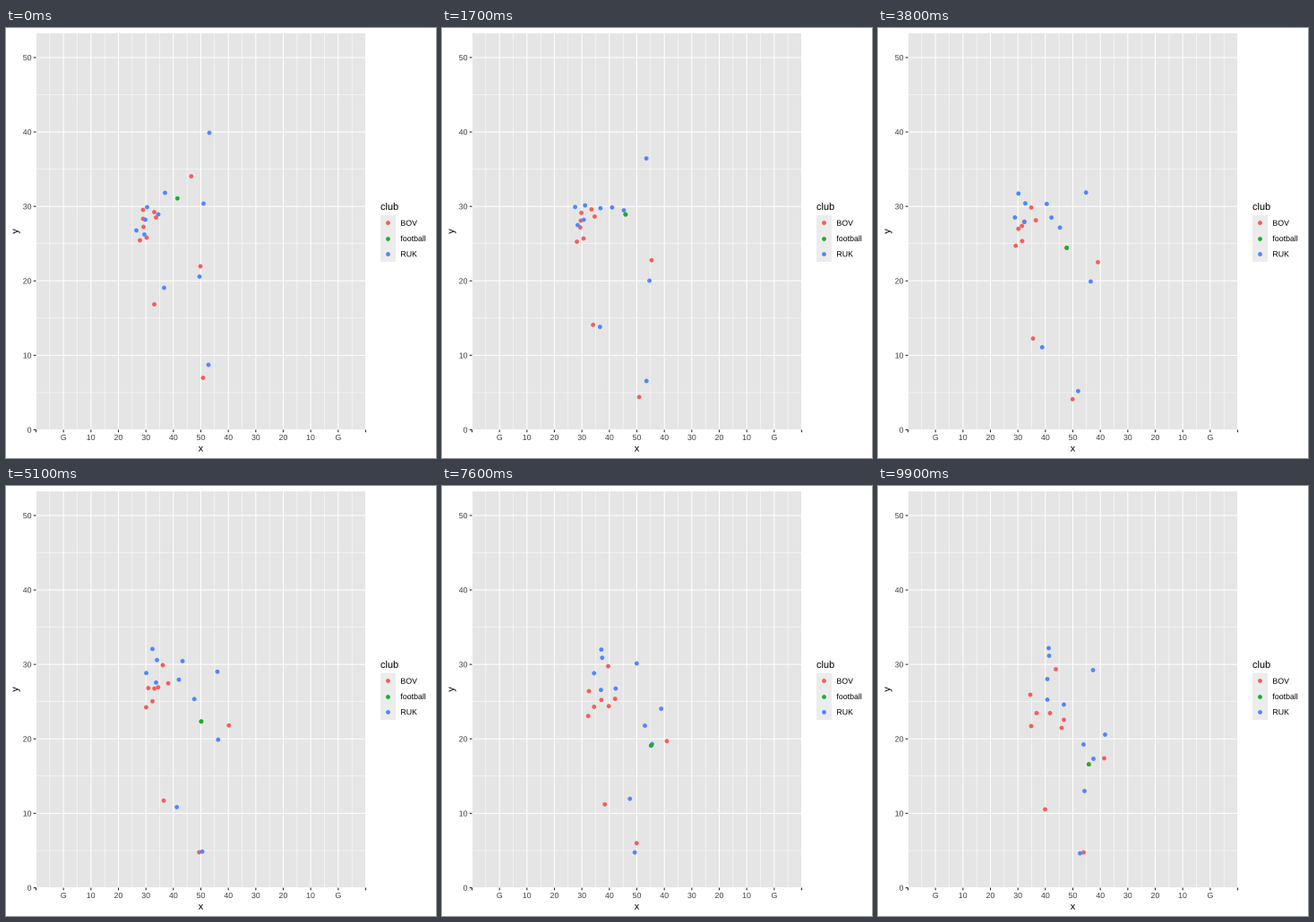
These frames come from a looping animation (480 px wide and 480 px high, 10000 ms). A matplotlib script:

```python
import numpy as np
import matplotlib.pyplot as plt
from matplotlib.animation import FuncAnimation
from matplotlib.patches import PathPatch, Rectangle
from matplotlib.textpath import TextPath
from matplotlib.transforms import Affine2D

plt.rcParams["font.family"] = "Liberation Sans"

SIZE, DPI = 480, 100
PX = 72 / DPI                       # one pixel in points
FRAMES, INTERVAL = 100, 100
LEFT, RIGHT, TOP, BOTTOM = 33.5, 401.5, 5.5, 448.5
RED, GREEN, BLUE = "#F35E5A", "#17B12B", "#5086FF"
PANEL, KEY, TICK, LABEL = "#E5E5E5", "#ECECEC", "#282828", "#404040"
DOT = (4.8 * PX) ** 2
CATCH = 9                           # frame at which the ball is caught

time = np.linspace(0, 1, FRAMES)
paths, colors = [], []


def add(color, path):
    paths.append(path)
    colors.append(color)
    return path


def run(color, *points):
    """Smooth polynomial run through points evenly spaced in time."""
    n = len(points)
    coef = np.polyfit(np.linspace(0, 1, n), points, n - 1)
    return add(color, np.vander(time, n) @ coef)


def block(start, end):
    """Hold ground at first, then get pushed back faster and faster."""
    gain = time[:, None] ** 1.7
    add(RED, (1 - gain) * start + gain * np.array(end))


# Returning side
carrier = run(RED, (206.8, 165.6), (206, 223.5), (217, 261), (232.5, 288), (235.3, 310.7))
block((153, 203), (205, 270))
block((153, 213), (192, 253.5))
block((153.5, 222), (170, 233))
block((157, 234), (177, 253.5))
block((149.5, 237), (171, 268))
run(RED, (165.5, 205.5), (174.5, 200), (198.5, 204.5))
run(RED, (167.5, 211.5), (180.5, 219.5), (207.5, 261))
run(RED, (217, 266), (243.5, 260), (250.5, 277), (252.5, 304))
run(RED, (165.5, 308.5), (172, 344), (179.5, 354), (186.5, 361))
run(RED, (220, 390.5), (218, 415.5), (215.5, 401.5), (229.5, 409))

# Covering side
run(BLUE, (157.5, 200), (168, 194.5), (191, 189.5))
run(BLUE, (170, 208), (196, 195.5), (240, 205.5))
run(BLUE, (155.5, 214), (167, 219), (189, 238.5))
run(BLUE, (154.5, 230.5), (156, 209), (189, 215.5))
run(BLUE, (227, 117), (231, 174.5), (241, 233), (253.5, 277.5))
run(BLUE, (177.5, 184), (193.5, 209.5), (192.5, 221.5), (207.5, 244))
run(BLUE, (220.5, 196), (201.5, 217.5), (220.5, 256), (229.5, 288.5))
run(BLUE, (145.5, 226), (154.5, 187), (172, 182), (190.5, 181))
run(BLUE, (216, 277.5), (237, 283), (235, 285), (240.5, 304.5))
run(BLUE, (176.5, 290), (181, 353.5), (201.5, 354), (230.5, 340.5))
run(BLUE, (226, 376), (225, 403.5), (215.5, 409), (225.5, 410))

# The ball flies straight to the carrier, then stays with him
ball = carrier.copy()
flight = np.linspace(0, 1, CATCH + 1)[:, None]
ball[:CATCH + 1] = (1 - flight) * (191.4, 190.2) + flight * carrier[CATCH]
add(GREEN, ball)
paths = np.array(paths)

fig = plt.figure(figsize=(SIZE / DPI, SIZE / DPI), dpi=DPI, facecolor="white")
ax = fig.add_axes([0, 0, 1, 1])
ax.set_xlim(0, SIZE)
ax.set_ylim(SIZE, 0)
ax.axis("off")


def px(x):
    return LEFT + x * (RIGHT - LEFT) / 120


def py(y):
    return BOTTOM - y * (BOTTOM - TOP) / 53.3


def line(x0, y0, x1, y1, color="white", width=1.07):
    ax.plot([x0, x1], [y0, y1], color=color, lw=width * PX, snap=False,
            solid_capstyle="butt", zorder=2)


def box(x, y, w, h, color):
    ax.add_patch(Rectangle((x, y), w, h, fc=color, lw=0, zorder=1))


def text(x, y, s, size=8.8, color=LABEL, align=0.5, angle=0):
    """Outlined text on baseline y; align 0 is left, 0.5 centre, 1 right."""
    path = TextPath((0, 0), s, size=size)
    if align:
        ink = path.get_extents()
        path = path.transformed(Affine2D().translate(-ink.x0 - align * ink.width, 0))
    place = Affine2D().rotate_deg(angle).scale(1, -1).translate(x, y)
    ax.add_patch(PathPatch(path.transformed(place), fc=color, lw=0, zorder=3))


box(LEFT, TOP, RIGHT - LEFT, BOTTOM - TOP, PANEL)
for offset, width in ((5, 0.53), (0, 1.07)):
    for x in range(offset, 121, 10):
        line(px(x), TOP, px(x), BOTTOM, width=width)
    for y in range(offset, 54, 10):
        line(LEFT, py(y), RIGHT, py(y), width=width)

for x in range(0, 121, 10):
    line(px(x), BOTTOM, px(x), BOTTOM + 2.75, TICK)
    yard = min(x, 120 - x) - 10
    if yard >= 0:
        text(px(x), 460, str(yard or "G"))
for y in range(0, 51, 10):
    line(LEFT - 2.75, py(y), LEFT, py(y), TICK)
    text(28.2, py(y) + 3.2, str(y), align=1)
text(217.5, 472.7, "x", 11, "black")
text(13.4, 227, "y", 11, "black", angle=90)

text(418, 203, "club", 11, "black", align=0)
for i, (name, color) in enumerate((("BOV", RED), ("football", GREEN), ("RUK", BLUE))):
    y = 217.5 + 17.28 * i
    box(418, y - 8.64, 17.28, 17.28, KEY)
    ax.scatter([426.3], [y - 0.2], s=DOT, c=color, lw=0, zorder=3)
    text(440.4, y + 3.2, name, color="black", align=0)

dots = ax.scatter(paths[:, 0, 0], paths[:, 0, 1], s=DOT, c=colors, lw=0, zorder=4)


def update(frame):
    dots.set_offsets(paths[:, frame])
    return (dots,)


anim = FuncAnimation(fig, update, frames=FRAMES, interval=INTERVAL,
                     repeat=True, repeat_delay=0)
plt.show()
```
